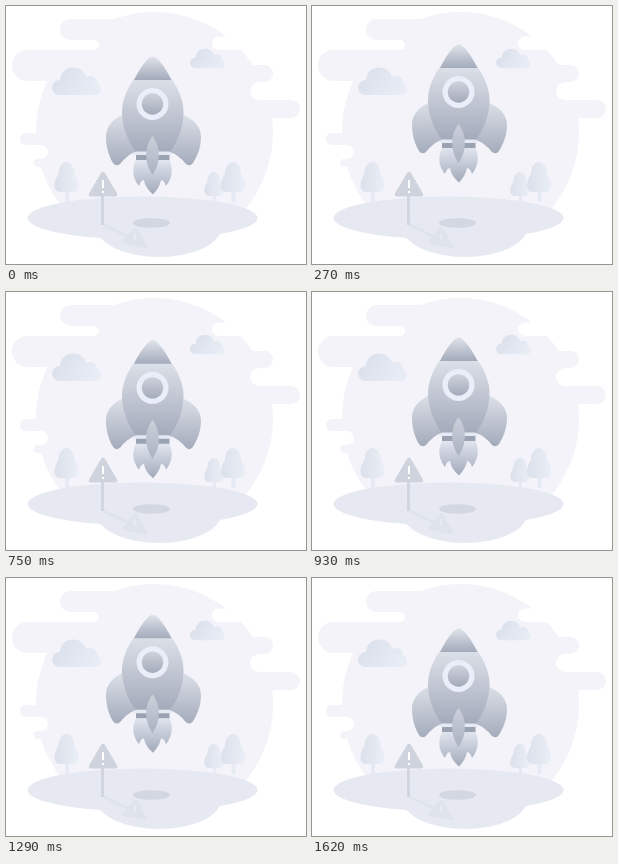
An HTML page with a canvas for the animation above (1.71 s loop, 300x258 px).

```html
<!DOCTYPE html>
<html lang="en">
<head>
<meta charset="utf-8">
<title>Hovering rocket</title>
<style>
html, body { margin: 0; width: 100%; height: 100%; overflow: hidden; background: #fff; }
canvas { display: block; width: 300px; height: 258px; }
</style>
</head>
<body>
<canvas id="stage" width="300" height="258"></canvas>
<script>
const ctx = document.getElementById('stage').getContext('2d');

const STEP = 30, LOOP = 1710, LAST_STEP = 54, HOVER_STEPS = 27;
const LIFT = 14.5;
const SKY = '#f3f3f9', LIGHT = '#dce0e8', DARK = '#a3aaba';

function blend(x0, y0, x1, y1, from, to) {
  const g = ctx.createLinearGradient(x0, y0, x1, y1);
  g.addColorStop(0, from);
  g.addColorStop(1, to);
  return g;
}

const fade = (y0, y1, from = LIGHT, to = DARK) => blend(0, y0, 0, y1, from, to);

function shape(d, fill) {
  ctx.fillStyle = fill;
  ctx.fill(new Path2D(d));
}

function oval(x, y, rx, ry, fill) {
  ctx.fillStyle = fill;
  ctx.beginPath();
  ctx.ellipse(x, y, rx, ry, 0, 0, Math.PI * 2);
  ctx.fill();
}

function pill(x0, y0, x1, y1, fill = SKY) {
  ctx.fillStyle = fill;
  ctx.beginPath();
  ctx.roundRect(x0, y0, x1 - x0, y1 - y0, (y1 - y0) / 2);
  ctx.fill();
}

function line(x0, y0, x1, y1, width, color) {
  ctx.strokeStyle = color;
  ctx.lineWidth = width;
  ctx.beginPath();
  ctx.moveTo(x0, y0);
  ctx.lineTo(x1, y1);
  ctx.stroke();
}

function backdrop() {
  oval(148.5, 126, 118.5, 120, SKY);
  pill(54, 13, 160, 34);
  pill(6, 44, 120, 75);
  pill(180, 59, 267, 76);
  pill(180, 94, 294, 112);
  pill(14, 127, 100, 139);
  pill(28, 153, 100, 161);
  // Notches cut into the edge of the disc.
  pill(40, 34, 93, 44, '#fff');
  pill(206, 30.5, 260, 44, '#fff');
  pill(244, 76, 300, 94, '#fff');
  pill(0, 139, 42, 153, '#fff');
}

function cloud(x, y, scale) {
  ctx.save();
  ctx.translate(x, y);
  ctx.scale(scale, scale);
  shape('M8 27 C-2 27 -3 13 8 12 C9 -4 31 -4 34 9 C41 6 45 10 45 15 C51 18 50 27 43 27Z',
    blend(8, 4, 40, 27, '#dbe1ec', '#e8ecf5'));
  ctx.restore();
}

function tree(x, top, scale) {
  ctx.save();
  ctx.translate(x, top);
  ctx.scale(scale, scale);
  line(0.5, 24, 0.5, 40, 4, '#e6eaf3');
  shape('M0 0 C5 0 8 6 8 12 C13 19 14 29 7 30 H-7 C-14 29 -13 19 -8 12 C-8 6 -5 0 0 0Z',
    blend(-10, 0, 10, 0, '#dce1eb', '#e9edf5'));
  ctx.restore();
}

function ground() {
  const soil = '#e6e9f1';
  oval(136.5, 212, 115, 21.5, soil);
  oval(153, 222, 62, 29, soil);
  oval(145.5, 217, 18.5, 4.8, '#d3d7e1');
}

function sign() {
  line(98, 219, 125, 232, 2.5, '#dfe3eb');
  shape('M116 236 L128 222 Q130 221 132 224 L141 240 Q142 243 138 242 L118 238Z', '#dfe3eb');
  line(129, 227, 129, 234, 1.5, '#e9ecf3');
  line(96.5, 190, 96.5, 219, 3, '#d0d5df');
  shape('M95 167 Q97 164 99 167 L111 187.5 Q112 190.5 109 190.5 H85 Q82 190.5 83 187.5Z',
    '#ced3dd');
  line(97, 174, 97, 182, 2, '#fff');
  oval(97, 186, 1.2, 1.2, '#fff');
}

function rocket(lift) {
  ctx.save();
  ctx.translate(0, -LIFT * lift);

  shape('M130 154 H163.5 C167 162 167 171 160 180 C159 176 157 174 155 174 ' +
    'C154 180 151 184 147 188.5 C142 184 139 180 138 174 C136 174 134 176 133 180 ' +
    'C126 171 126 162 130 154Z', fade(154, 188, '#e0e5ef'));
  shape('M127.5 145 H165.5 V149 H127.5Z', '#e4e9f3');
  shape('M130 149 H163.5 V154 H130Z', '#9ba2b1');

  const fin = fade(108, 160);
  shape('M118 108 C107 113 100 120 100 131 C100 143 104 152 107 157 ' +
    'Q110 161 114 158 Q121 149 130 145.5Z', fin);
  shape('M175.5 108 C187 113 195 120 195 131 C195 143 190 152 187 157 ' +
    'Q184 161 180 158 Q173 149 163 145.5Z', fin);

  shape('M128 73 H165.5 C172 82 177.5 94 177.5 106 C177.5 121 172 135 164 145.5 H129.5 ' +
    'C122 135 116 121 116 106 C116 94 121.5 82 128 73Z', fade(73, 146));
  shape('M128 74 C133 64 138 56 144 51.5 Q146.8 49.5 149.5 51.5 C155.5 56 160.5 64 165.5 74Z',
    fade(50, 74, '#e0e4eb'));

  oval(146.5, 98, 16, 16, '#e9eef9');
  oval(146.5, 98, 10.7, 10.7, fade(87, 109, '#cfd3dc'));
  shape('M146.5 130 C155 141 155 157 146.5 169 C138 157 138 141 146.5 130Z',
    fade(130, 169, '#ccd1db', '#abb2c0'));
  ctx.restore();
}

// Rises and sinks twice per loop, then rests on the last step.
function liftAt(time) {
  const step = Math.min(Math.floor((time % LOOP) / STEP), LAST_STEP);
  const phase = (step % HOVER_STEPS) / HOVER_STEPS;
  return Math.sin(Math.PI * phase) ** 1.3;
}

function draw(time) {
  ctx.clearRect(0, 0, 300, 258);
  backdrop();
  cloud(46, 62, 1);
  cloud(184, 43, 0.71);
  tree(60.5, 156, 1);
  tree(208, 166, 0.8);
  tree(227, 156, 1);
  ground();
  sign();
  rocket(liftAt(time));
}

const start = performance.now();
function tick() {
  draw(performance.now() - start);
  requestAnimationFrame(tick);
}
tick();
</script>
</body>
</html>
```
